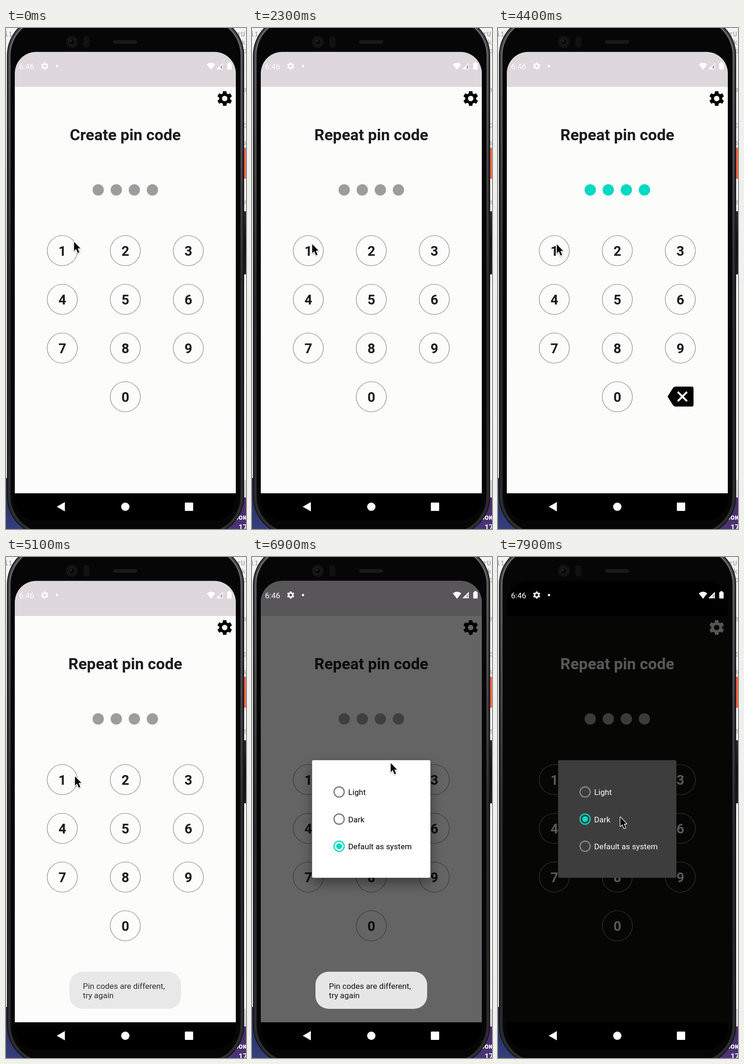
An HTML page with a canvas for the animation above (8000 ms loop, 518 by 1080 pixels).

```html
<!DOCTYPE html>
<html>
<head>
<meta charset="utf-8">
<style>
html, body { margin: 0; width: 100%; height: 100%; overflow: hidden; background: #f1f1f1; }
canvas { display: block; }
</style>
</head>
<body>
<canvas id="stage" width="518" height="1080"></canvas>
<script>
const W = 518, H = 1080, LOOP = 8000, TEAL = '#00d9c3';
const stage = document.getElementById('stage');
const main = stage.getContext('2d');
const layer = Object.assign(document.createElement('canvas'), { width: W, height: H }).getContext('2d');
let g = main;

const light = { status: '#ded8dc', app: '#fcfcfa', ink: '#1b1b1e', gear: '#000', ring: '#828288', dot: '#9d9d9d', card: '#fff', label: '#000', radio: '#747474' };
const dark = { status: '#000', app: '#0e0e0c', ink: '#dedede', gear: '#d6d6d6', ring: '#8e8e8e', dot: '#949494', card: '#3d3d3d', label: '#fff', radio: '#8c8c8c' };

const clamp = v => Math.max(0, Math.min(1, v));
const ramp = (t, a, b) => clamp((t - a) / (b - a));
const ease = p => p * p * (3 - 2 * p);

function rect(x, y, w, h, fill, r = 0) {
  g.beginPath();
  g.roundRect(x, y, w, h, r);
  g.fillStyle = fill;
  g.fill();
}

function circle(x, y, r, fill, stroke, width) {
  g.beginPath();
  g.arc(x, y, r, 0, Math.PI * 2);
  if (fill) { g.fillStyle = fill; g.fill(); }
  if (stroke) { g.strokeStyle = stroke; g.lineWidth = width; g.stroke(); }
}

function poly(points, fill) {
  g.beginPath();
  points.forEach(p => g.lineTo(p[0], p[1]));
  g.closePath();
  g.fillStyle = fill;
  g.fill();
}

function text(str, x, y, size, fill, align = 'left', weight = 400, family = 'Roboto, sans-serif') {
  g.font = `${weight} ${size}px ${family}`;
  g.textAlign = align;
  g.fillStyle = fill;
  g.fillText(str, x, y);
}

function gradient(y0, y1, ...stops) {
  const grad = g.createLinearGradient(0, y0, 0, y1);
  stops.forEach((c, i) => grad.addColorStop(i / (stops.length - 1), c));
  return grad;
}

// Draws a set of shapes as one translucent group.
function group(alpha, draw) {
  if (alpha <= 0) return;
  layer.clearRect(0, 0, W, H);
  g = layer;
  draw();
  g = main;
  g.globalAlpha = alpha;
  g.drawImage(layer.canvas, 0, 0);
  g.globalAlpha = 1;
}

function gear(x, y, r, fill) {
  g.save();
  g.translate(x, y);
  g.beginPath();
  for (let k = 0; k < 6; k++) {
    const a = k * Math.PI / 3 - Math.PI / 2;
    for (const [d, q] of [[-.37, .73], [-.23, 1], [.23, 1], [.37, .73]])
      g.lineTo(Math.cos(a + d) * r * q, Math.sin(a + d) * r * q);
  }
  g.closePath();
  g.moveTo(r * .36, 0);
  g.arc(0, 0, r * .36, 0, Math.PI * 2);
  g.fillStyle = fill;
  g.fill('evenodd');
  g.restore();
}

function desktop() {
  rect(0, 0, W, H, '#f3f3f4');
  const code = (str, x, y) => text(str, x, y, 15, '#929292', 'left', 400, '"Noto Sans Mono", monospace');
  code('i1', -4, 18);
  code('irU', 489, 18);
  code('k', 508, 36);
  ['o', 'a', 'c', 's', 'e'].forEach((c, i) => code(c, 511, [54, 138, 214, 252, 380][i]));
  rect(511, 258, 7, 67, '#fb6549');
  rect(511, 556, 7, 418, '#fafafa');
  rect(511, 974, 7, 38, '#d8d8da');
  rect(0, 970, 80, 110, gradient(970, H, '#24294f', '#343f7d'));
  rect(430, 1012, 88, 68, gradient(1012, H, '#4b2a6b', '#4a3476'));
  text('рок', 493, 1060, 16, '#fff', 'left', 700);
  text('17', 502, 1082, 16, '#fff', 'left', 700);
}

// One line of the metal rim, inset from the outer edge.
function rim(inset, width, stroke) {
  g.beginPath();
  g.roundRect(2 + inset, -26 + inset, 512 - 2 * inset, 1121 - 2 * inset, 85 - inset);
  g.strokeStyle = stroke;
  g.lineWidth = width;
  g.stroke();
}

function phone() {
  rect(511, 395, 8, 136, gradient(395, 531, '#2a2a2c', '#101012', '#1a1a1c'), 2);
  rect(2, -26, 512, 1121, '#121214', 85);
  rim(4.5, 5, gradient(0, H, '#4a4a4d', '#343437', '#262629', '#262629', '#2c2c2f'));
  rim(6.5, 1.5, gradient(0, H, '#8a8a8e', '#727276', '#38383b', '#2e2e31', '#343437'));
  rect(11, -17, 494, 1103, '#060607', 76);
  circle(142, 30, 13, '#121214');
  circle(142, 30, 7, '#08080b', '#1d1d22', 2);
  circle(140, 28, 2, '#2c2c38');
  rect(167, 18, 13, 24, '#111113', 5);
  rect(231, 26, 52, 8, '#19191a', 4);
}

function statusIcons() {
  const c = '#fff';
  text('6:46', 28, 88.5, 17, c);
  gear(83.5, 82, 8, c);
  circle(110, 82, 2.5, c);
  g.beginPath();
  g.moveTo(442.5, 90);
  g.lineTo(433.5, 78.5);
  g.quadraticCurveTo(442.5, 71, 451.5, 78.5);
  g.closePath();
  g.fill();
  poly([[454, 89], [468, 89], [468, 75]], c);
  poly([[463, 87.5], [466.5, 87.5], [466.5, 79], [463, 82.5]], 'rgba(130,125,130,.7)');
  rect(477.5, 75.5, 9.5, 14, c, 1.5);
  rect(480, 73.5, 4.5, 3, c);
}

function navBar() {
  rect(19, 1003, 477, 59, '#000', [0, 0, 46, 46]);
  poly([[109.5, 1032], [127, 1022], [127, 1042]], '#fff');
  circle(257.5, 1032, 9, '#fff');
  rect(386, 1023, 18, 18, '#fff', 1.5);
}

function backspace() {
  g.beginPath();
  g.moveTo(366, 794.5);
  g.lineTo(377, 777);
  g.quadraticCurveTo(379.5, 773, 384, 773);
  g.arcTo(422, 773, 422, 816, 4);
  g.arcTo(422, 816, 380, 816, 4);
  g.lineTo(384, 816);
  g.quadraticCurveTo(379.5, 816, 377, 812);
  g.closePath();
  g.fillStyle = '#000';
  g.fill();
  g.beginPath();
  for (const s of [-1, 1]) {
    g.moveTo(398 - 10, 794.5 - 10 * s);
    g.lineTo(398 + 10, 794.5 + 10 * s);
  }
  g.strokeStyle = '#fff';
  g.lineWidth = 4;
  g.stroke();
}

function pinScreen(theme, title, count) {
  rect(19, 127, 477, 876, theme.app);
  gear(472, 152, 16.3, theme.gear);
  text(title, 257.5, 242, 34, theme.ink, 'center', 700);
  for (let i = 0; i < 4; i++) circle(199 + 39 * i, 349, 12.2, i < count ? TEAL : theme.dot);
  for (let n = 0; n < 10; n++) {
    const k = n ? n - 1 : 10;
    const x = 121.5 + 136 * (k % 3), y = 480 + 105 * Math.floor(k / 3);
    circle(x, y, 32.5, null, theme.ring, 1.1);
    text(n, x, y + 11, 29.2, theme.ink, 'center', 700);
  }
  if (count) backspace();
}

function dialog(theme, picked, pressed) {
  g.save();
  if (theme === light) {
    g.shadowColor = 'rgba(0,0,0,.4)';
    g.shadowBlur = 26;
    g.shadowOffsetY = 12;
  }
  rect(129.7, 438, 255.3, 253.5, theme.card, 3);
  g.restore();
  if (pressed) circle(188, 565, 21, 'rgba(0,0,0,.13)');
  ['Light', 'Dark', 'Default as system'].forEach((label, i) => {
    const y = 506.5 + 58.5 * i;
    const on = i === picked;
    const color = (pressed ? i === 1 : on) ? TEAL : theme.radio;
    circle(188, y, 11, null, color, 2.4);
    if (on) circle(188, y, 6.3, color);
    text(label, 207.5, y + 6.5, 17.2, theme.label);
  });
}

function toast() {
  rect(137, 894, 241, 80, '#e6e6e6', 28);
  text('Pin codes are different,', 166, 930.5, 17.3, '#111');
  text('try again', 166, 950.5, 17.3, '#111');
}

const path = [
  [0, 147, 461], [500, 143, 465], [1300, 139, 463], [2300, 130, 466], [3400, 110, 459],
  [4300, 126, 466], [5100, 149, 473], [5500, 152, 470], [6150, 455, 153], [6450, 455, 153],
  [7150, 235.5, 564], [7350, 235.5, 564], [7800, 264, 561], [LOOP, 264, 561]
];

function cursor(t) {
  const i = path.findIndex(p => p[0] > t);
  const [a, b] = [path[i - 1], path[i]];
  const p = ease(ramp(t, a[0], b[0]));
  g.save();
  g.translate(a[1] + (b[1] - a[1]) * p, a[2] + (b[2] - a[2]) * p);
  g.beginPath();
  for (const [x, y] of [[0, 0], [0, 19.5], [4.4, 15.3], [8, 24], [11.3, 22.6], [7.7, 14.1], [13.5, 14.1]])
    g.lineTo(x, y);
  g.closePath();
  g.lineJoin = 'round';
  g.lineWidth = 2.6;
  g.strokeStyle = '#fff';
  g.shadowColor = 'rgba(0,0,0,.35)';
  g.shadowBlur = 3;
  g.shadowOffsetY = 1;
  g.stroke();
  g.shadowColor = 'transparent';
  g.fillStyle = '#000';
  g.fill();
  g.restore();
}

const taps = [600, 1100, 1600, 2000, 2700, 3200, 3800, 4400];

function frame(t) {
  const repeat = t >= 2200;
  const blank = t >= 7200 && t < 7500;
  const theme = t >= 7500 ? dark : light;
  const done = taps.filter(at => t >= at).length;
  const count = t >= 4900 ? 0 : repeat ? done - 4 : done;

  desktop();
  phone();
  rect(19, 51.5, 477, 75.5, blank ? '#000' : theme.status, [46, 46, 0, 0]);
  if (blank) rect(19, 127, 477, 876, '#000');
  else pinScreen(theme, repeat ? 'Repeat pin code' : 'Create pin code', count);

  const dim = theme === dark ? .6 : .6 * ramp(t, 6200, 6400);
  if (dim && !blank) rect(19, 51.5, 477, 951.5, `rgba(0,0,0,${dim})`, [46, 46, 0, 0]);
  statusIcons();
  navBar();

  if (t >= 7500) group(ramp(t, 7400, 7600), () => dialog(dark, 1));
  else if (t >= 7200) group(.41 + (7300 - t) / 250, () => dialog(light, 2, true));
  else group(Math.pow(ramp(t, 6200, 6400), .27), () => dialog(light, 2));

  group(Math.min(.88 * ramp(t, 4900, 5100) + .12 * ramp(t, 5100, 5200), 1 - ramp(t, 6900, 7100)), toast);
  cursor(t);
}

function tick(now) {
  frame(Math.floor((now % LOOP) / 100) * 100);
  requestAnimationFrame(tick);
}
requestAnimationFrame(tick);
</script>
</body>
</html>
```
